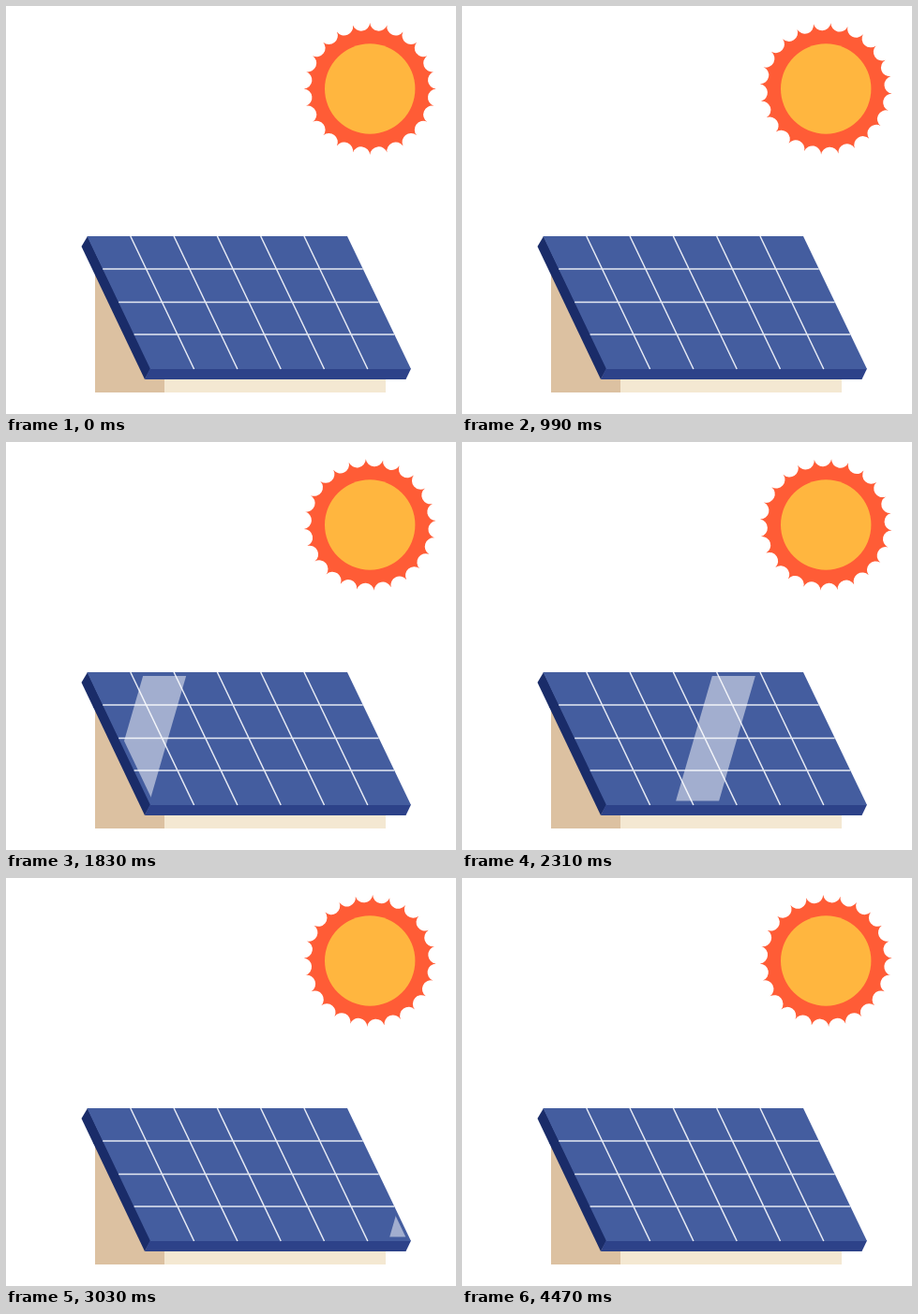
Write an HTML page that moves like this. It is 480 by 436 pixels and loops after 4500 ms.

```html
<!DOCTYPE html>
<html lang="en">
<head>
<meta charset="utf-8">
<title>Solar panel</title>
<style>
  html, body { margin: 0; width: 100%; height: 100%; overflow: hidden; background: #fff; }
  svg { display: block; width: 100vw; height: 100vh; }
</style>
</head>
<body>
<svg viewBox="0 0 480 436">
  <defs>
    <clipPath id="glass"><path d="M93 250H362.5L426.3 383.5H156.5Z"/></clipPath>
  </defs>

  <g transform="translate(388.2 88.5)">
    <path id="rays" fill="#ff5c36"/>
    <circle r="48.2" fill="#ffb63f"/>
  </g>

  <path d="M95 280H169V413H95Z" fill="#dcc1a1"/>
  <path d="M169 390H405V413H169Z" fill="#f4e8d2"/>

  <path d="M87 246L80.5 257L148 399L154.5 387Z" fill="#1a2c69"/>
  <path d="M153.5 387.5H432L426.5 399H148Z" fill="#2d4289"/>
  <path d="M86.5 246H364L432 388H154Z" fill="#445d9f"/>
  <path id="grid" fill="none" stroke="#e6eaf4" stroke-width="1.5"/>

  <g clip-path="url(#glass)">
    <path id="shine" d="M0 384L39 249.5H85L46 384Z" fill="#fff" fill-opacity=".5"/>
  </g>
</svg>
<script>
const LOOP = 4500;
const RAYS = 24, TIP = 70.5, BITE = 9.4;
const $ = id => document.getElementById(id);

// Spiked rim: concave arcs joining evenly spaced tips
function rimPath() {
  let d = '';
  for (let i = 0; i <= RAYS; i++) {
    const a = i / RAYS * 2 * Math.PI;
    const p = `${(TIP * Math.sin(a)).toFixed(2)} ${(-TIP * Math.cos(a)).toFixed(2)}`;
    d += i ? `A${BITE} ${BITE} 0 0 0 ${p}` : `M${p}`;
  }
  return d + 'Z';
}

function gridPath() {
  const slope = 67.8 / 142;
  let d = '';
  for (const y of [281, 316.5, 351]) {
    const dx = (y - 246) * slope;
    d += `M${86.5 + dx} ${y}H${364 + dx}`;
  }
  for (let i = 0; i < 5; i++) {
    const x = 132.8 + i * 46.3;
    d += `M${x} 246L${x + 67.8} 388`;
  }
  return d;
}

$('rays').setAttribute('d', rimPath());
$('grid').setAttribute('d', gridPath());

function draw(t) {
  $('rays').setAttribute('transform', `rotate(${360 * t / LOOP})`);
  $('shine').setAttribute('transform', `translate(${228 + 0.2515 * (t - 2310)} 0)`);
}

let start;
function tick(now) {
  start ??= now;
  draw((now - start) % LOOP);
  requestAnimationFrame(tick);
}
draw(0);
requestAnimationFrame(tick);
</script>
</body>
</html>
```
